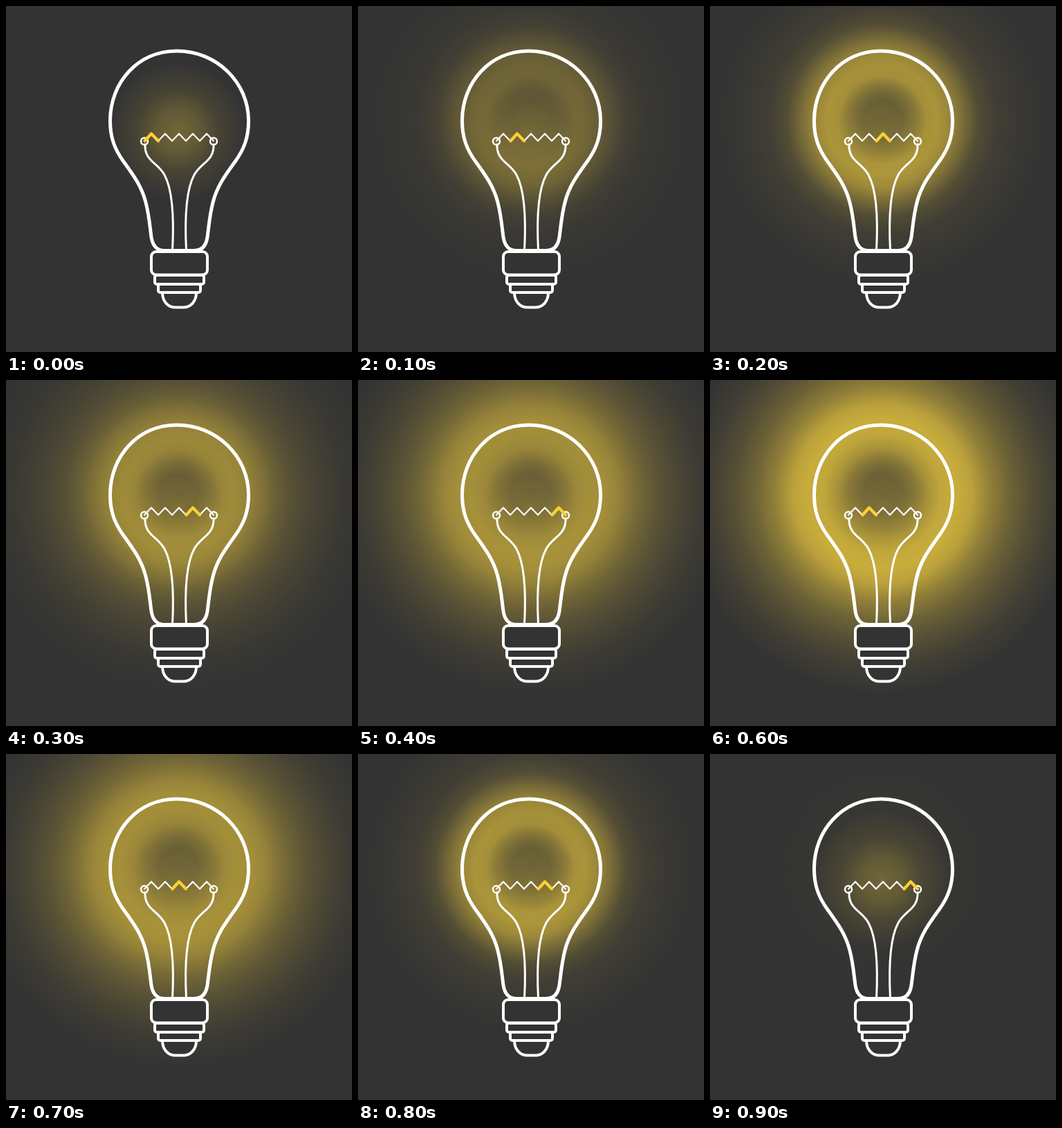
An HTML page that plays this animation: 500x500 px, repeating every 1 s.

```html
<!DOCTYPE html>
<html lang="en">
<head>
<meta charset="utf-8">
<title>Light bulb</title>
<style>
  html, body { margin: 0; width: 100%; height: 100%; overflow: hidden; background: #333; }
  svg { display: block; width: 100%; height: 100%; }
</style>
</head>
<body>
<svg viewBox="0 0 500 500" fill="none" stroke-linecap="round" stroke-linejoin="round">
  <defs>
    <radialGradient id="coreFill" gradientUnits="userSpaceOnUse" cx="248" cy="181" r="100"></radialGradient>
    <radialGradient id="nearFill" gradientUnits="userSpaceOnUse" cx="249" cy="165" r="240"></radialGradient>
    <radialGradient id="farFill" gradientUnits="userSpaceOnUse" cx="249" cy="165" r="290"></radialGradient>
  </defs>

  <rect width="500" height="500" fill="#333"/>
  <rect id="near" width="500" height="500" fill="url(#nearFill)"/>
  <rect id="far" width="500" height="500" fill="url(#farFill)"/>
  <rect width="500" height="500" fill="url(#coreFill)"/>

  <g stroke="#fff">
    <path stroke-width="5" d="M247 65C191 65 150.500 110 150.500 166C150.500 190 157 207 170 225C183 243 196 260 202 284C207 303 208 320 210 334C212 347 218 353.500 229 353.500H272C283 353.500 289 347 291 334C293 320 294 303 299 284C305 260 318 243 331 225C344 207 350.500 190 350.500 166C350.500 110 304 65 247 65Z"/>
    <path stroke-width="3" d="M201 200C200 224 219 226 229 244C241 266 243 305 240.500 353M300 200C301 224 282 226 272 244C260 266 258 305 260.500 353"/>
    <g stroke-width="4" fill="#333">
      <path d="M226 414C226 427 234 435.500 245 435.500H256C267 435.500 275 427 275 414Z"/>
      <rect x="220" y="402" width="61" height="12" rx="3"/>
      <rect x="215" y="389" width="71" height="13" rx="3"/>
      <rect x="210" y="355" width="81" height="33.500" rx="7"/>
    </g>
    <g stroke-width="2.500">
      <circle cx="200" cy="195.500" r="5"/>
      <circle cx="300" cy="195.500" r="5"/>
    </g>
    <path stroke-width="2.200" d="M200 195l10-10.500 10 10.500 10-10.500 10 10.500 10-10.500 10 10.500 10-10.500 10 10.500 10-10.500 10 10.500"/>
  </g>
  <path id="spark" stroke="#ffd033" stroke-width="4.300" d="M200.500 195l9.500-10.500 10 10.500"/>
</svg>
<script>
  const STEP = 100;
  // 0: core only, 1: near halo lit, 2: far halo lit
  const levels = [0, .5, 1, 1.33, 1.65, 1.85, 2, 1.65, 1, .04];
  const get = id => document.getElementById(id);

  // Fills a radial gradient from pairs of [distance from centre, opacity]
  function glow(id, profile) {
    const radius = get(id).r.baseVal.value;
    for (const [distance, opacity] of profile) {
      const stop = document.createElementNS('http://www.w3.org/2000/svg', 'stop');
      stop.setAttribute('offset', distance / radius);
      stop.setAttribute('stop-color', '#f0cd3e');
      stop.setAttribute('stop-opacity', opacity);
      get(id).append(stop);
    }
  }

  glow('coreFill', [[0, .33], [30, .25], [60, .1], [100, 0]]);
  glow('nearFill', [
    [0, .04], [28, .12], [48, .36], [64, .57], [80, .61], [98, .54],
    [118, .36], [138, .17], [165, .07], [200, .03], [240, 0]
  ]);
  glow('farFill', [
    [0, .05], [28, .14], [48, .36], [66, .59], [85, .74], [108, .79],
    [130, .71], [155, .5], [185, .31], [215, .18], [250, .07], [290, 0]
  ]);

  function draw(now) {
    const step = Math.floor(now / STEP) % levels.length;
    const far = Math.max(levels[step] - 1, 0);
    get('near').setAttribute('opacity', Math.min(levels[step], 1) * (1 - far));
    get('far').setAttribute('opacity', far);
    get('spark').setAttribute('transform', `translate(${step % 5 * 20} 0)`);
  }

  const start = performance.now();
  function tick() {
    draw(performance.now() - start);
    requestAnimationFrame(tick);
  }
  tick();
</script>
</body>
</html>
```
